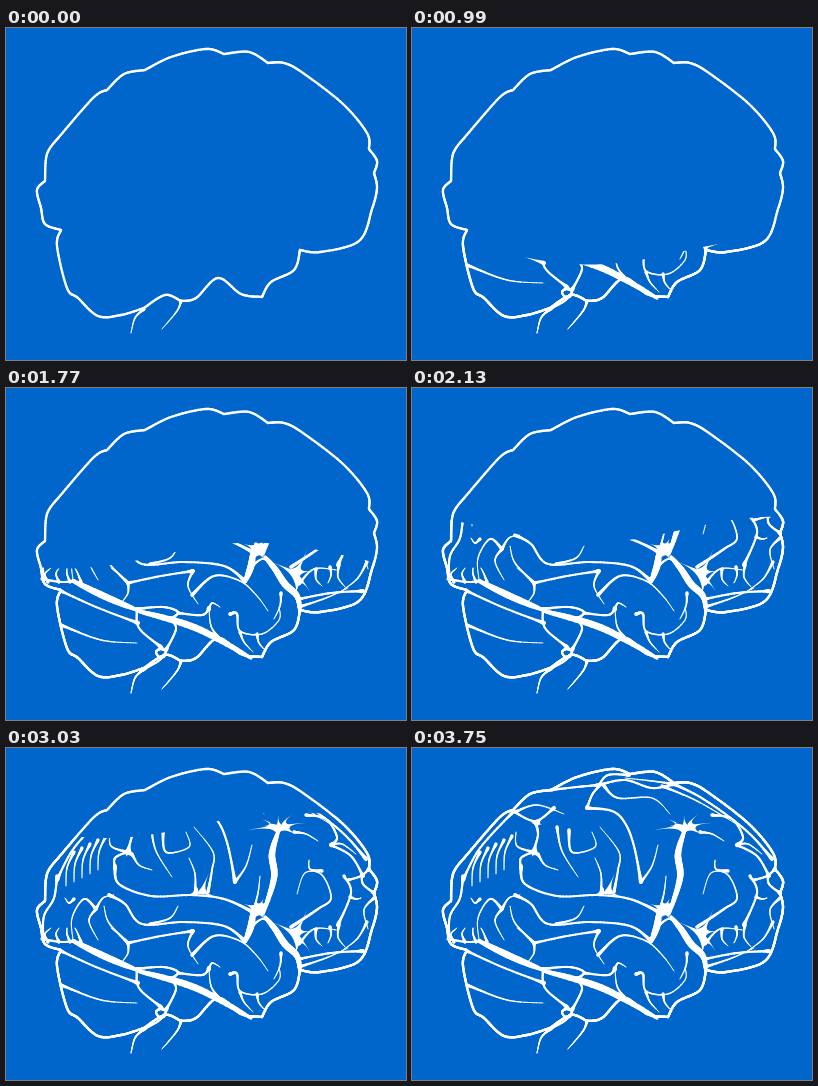
Recreate the animation shown at these times as an HTML page with a canvas. Size 400x332 px, loop 4500 ms.

```html
<!DOCTYPE html>
<html lang="en">
<head>
<meta charset="utf-8">
<title>Brain filling up</title>
<style>
html, body { margin: 0; width: 100%; height: 100%; overflow: hidden; background: #0066cc; }
canvas { display: block; }
</style>
</head>
<body>
<canvas id="stage" width="400" height="332"></canvas>
<script>
const W = 400, H = 332, LOOP = 4500, START = 120, FULL = 3750, STEP = 30;
const stage = document.getElementById('stage').getContext('2d');

// Line width as a function of the position u (0..1) along a line.
const rim = () => 2.3;
const link = u => 2.1 + 2 * Math.abs(2 * u - 1) ** 6;
const twig = u => 0.8 + 1.4 * (1 - u) + 1.5 * (1 - u) ** 6;
const trunk = u => 3.2 + 3.6 * Math.sin(Math.PI * u);

function makeLayer() {
  const canvas = document.createElement('canvas');
  canvas.width = W;
  canvas.height = H;
  const pen = canvas.getContext('2d');
  pen.strokeStyle = pen.fillStyle = '#fff';
  pen.lineCap = pen.lineJoin = 'round';
  return pen;
}

const parse = text => text.split(' ').map(pair => pair.split(',').map(Number));

const spline = (a, b, c, d, u) =>
  b + u / 2 * (c - a + u * (2 * a - 5 * b + 4 * c - d + u * (3 * (b - c) + d - a)));

// Smooth lines through a few key points each.
function lines(pen, width, ...paths) {
  for (const path of paths) {
    const pts = parse(path), n = pts.length - 1, steps = 12;
    const at = i => pts[Math.max(0, Math.min(n, i))];
    let last = pts[0];
    for (let k = 1; k <= n * steps; k++) {
      const i = Math.min(n - 1, Math.floor(k / steps)), u = k / steps - i;
      const next = [0, 1].map(j => spline(at(i - 1)[j], at(i)[j], at(i + 1)[j], at(i + 2)[j], u));
      pen.lineWidth = width(k / (n * steps));
      pen.beginPath();
      pen.moveTo(...last);
      pen.lineTo(...next);
      pen.stroke();
      last = next;
    }
  }
}

// Junction: a star whose sides curve in towards its centre.
function star(pen, ...tipSets) {
  for (const tips of tipSets) {
    const pts = parse(tips);
    const centre = [0, 1].map(j => pts.reduce((sum, p) => sum + p[j], 0) / pts.length);
    pen.beginPath();
    pen.moveTo(...pts[0]);
    pts.forEach((p, i) => pen.quadraticCurveTo(...centre, ...pts[(i + 1) % pts.length]));
    pen.fill();
  }
}

function drawOutline(pen) {
  lines(pen, rim,
    '39,153 31,162 35,180 39,196 55,202',
    '55,202 51,218 61,260 72,270 92,288 115,287 138,280',
    '138,280 159,267 175,273',
    '175,273 190,270 212,250 235,266 256,269',
    '256,269 265,254 288,242 294,222',
    '294,222 314,224 353,213 366,181 371,160 368,145',
    '368,145 371,133 363,121',
    '363,121 361,105 337,76 297,45 278,35 262,35',
    '262,35 243,24 218,26',
    '218,26 200,21 165,29 139,42',
    '139,42 118,46 101,62',
    '101,62 87,70 53,109',
    '53,109 41,126 39,153');
  lines(pen, twig, '138,281 129,290 125,305', '175,273 171,283 156,301');
}

function drawBase(pen) {
  lines(pen, twig,
    '55,237 95,252 131,255',
    '251,246 253,255 260,263',
    '234,244 238,254 247,264',
    '212,249 205,238 203,222',
    '203,222 206,215 214,219');
  lines(pen, link,
    '55,203 90,219 132,235',
    '131,221 133,240 155,259',
    '164,231 170,241 160,262',
    '155,260 150,264 154,269 160,264 155,260',
    '158,268 151,274 138,281',
    '130,221 157,219 172,224 165,231',
    '172,225 196,227 203,220');
  lines(pen, trunk, '67,193 100,209 131,222', '132,223 190,240 245,270');
}

function drawTemporalLobe(pen) {
  lines(pen, link,
    '122,195 155,188 187,183',
    '103,147 119,156 136,176 178,174 218,178 239,193',
    '109,118 113,136 145,148 185,147 218,151 247,164',
    '36,191 55,194 68,193');
  lines(pen, twig,
    '122,195 122,205 116,214',
    '122,195 114,187 105,180',
    '187,183 182,198 192,216',
    '186,207 208,188 234,193 251,208 262,223',
    '224,226 231,226 234,243 256,246 273,232 273,219',
    '275,205 274,218 268,231',
    '144,176 164,170 172,158',
    '90,161 83,173 92,192',
    '90,161 78,151 66,170 67,192',
    '90,161 97,150 108,147',
    '122,195 103,175 98,158',
    '68,151 63,155 59,150');
  // Short creases along the occipital edge
  for (let i = 0; i < 4; i++) {
    const x = 42 + 11 * i;
    lines(pen, twig, `${x},194 ${x - 3},186 ${x + 3 - 3 * i},180`);
  }
}

function drawCentre(pen) {
  lines(pen, trunk,
    '272,84 266,106 268,130 257,166',
    '247,163 245,178 239,194',
    '259,169 269,181 279,196 291,208 294,223');
  lines(pen, twig, '247,164 252,145 254,128', '247,177 257,171 266,178');
  star(pen,
    '238,156 250,152 258,150 266,152 258,172 244,178',
    '266,174 283,180 302,159 295,178 306,183 294,190 304,204 290,208',
    '242,82 258,78 248,68 261,75 270,77 272,67 277,77 288,65 287,77 300,75 291,87 272,90',
    '178,149 187,136 190,145 203,125 203,146 213,151');
  lines(pen, twig,
    '288,84 300,86 312,93',
    '189,146 189,126 183,110',
    '202,144 206,122 207,104 188,79',
    '229,134 240,118 246,97');
  lines(pen, link, '175,60 200,63 213,75 222,98 229,134');
}

function drawFrontalLobe(pen) {
  lines(pen, link,
    '293,211 325,205 357,203',
    '262,36 288,49 316,68 340,88 360,111',
    '300,67 320,71 331,89 325,97',
    '325,97 345,108 357,128',
    '338,128 345,145 332,177',
    '342,132 355,128 363,121',
    '356,126 357,136 368,145');
  lines(pen, twig,
    '293,219 320,210 342,200',
    '285,179 312,161 325,150 316,127 299,125 291,146',
    '316,123 304,121 303,112',
    '293,196 308,181 331,182',
    '310,181 310,191 316,198',
    '324,179 325,187 322,195',
    '361,174 351,191 334,204',
    '333,177 332,189 339,199',
    '344,149 350,151 355,150',
    '368,150 358,162 362,181',
    '325,97 336,96 350,106',
    '250,38 285,53 326,77');
}

function drawCrown(pen) {
  lines(pen, link,
    '139,42 165,39 187,37',
    '187,37 196,27 217,27',
    '187,37 213,32 240,40 262,36',
    '187,38 180,47 175,60',
    '101,63 123,73 142,60',
    '124,75 126,87 121,104',
    '121,104 109,110 109,120');
  lines(pen, twig,
    '262,36 240,33 213,30',
    '192,38 206,50 240,50 258,66',
    '103,64 125,57 152,66',
    '121,104 105,98 104,84',
    '126,106 133,117 146,122',
    '145,79 150,103 166,129',
    '157,82 160,104 183,99 180,84');
  star(pen, '108,68 124,72 137,66 130,77 125,87 119,75', '108,101 121,102 126,92 132,113 120,109');
}

function drawParietalLobe(pen) {
  lines(pen, link, '101,64 68,100 51,132', '51,128 48,150 38,168 37,190');
  // Creases fanning out beside the rim
  for (let i = 0; i < 5; i++) {
    const x = 68 + 8 * i, y = 104 - 4 * i;
    lines(pen, twig, `${x},${y} ${x - 7},${y + 16} ${x - 8},${y + 34}`);
  }
}

const outline = makeLayer(), whole = makeLayer();
drawOutline(outline);
for (const draw of [drawOutline, drawBase, drawTemporalLobe, drawCentre,
  drawFrontalLobe, drawCrown, drawParietalLobe]) draw(whole);

// Rising liquid surface with a wave that travels to the right.
function surface(x, t) {
  const level = 286 - 0.0718 * (t - START);
  const crest = 90 + 0.325 * (t - 1290);
  return level - 13 * Math.cos((x - crest) / 370 * 2 * Math.PI);
}

function render(now) {
  const time = now % LOOP;
  const t = START + Math.floor((time - START) / STEP) * STEP;
  stage.fillStyle = '#0066cc';
  stage.fillRect(0, 0, W, H);
  stage.drawImage(outline.canvas, 0, 0);
  if (time >= START) {
    stage.save();
    if (t < FULL) {
      stage.beginPath();
      stage.moveTo(0, H);
      for (let x = 0; x <= W; x += 4) stage.lineTo(x, surface(x, t));
      stage.lineTo(W, H);
      stage.clip();
    }
    stage.drawImage(whole.canvas, 0, 0);
    stage.restore();
  }
  requestAnimationFrame(() => render(performance.now() - begin));
}

const begin = performance.now();
render(0);
</script>
</body>
</html>
```
